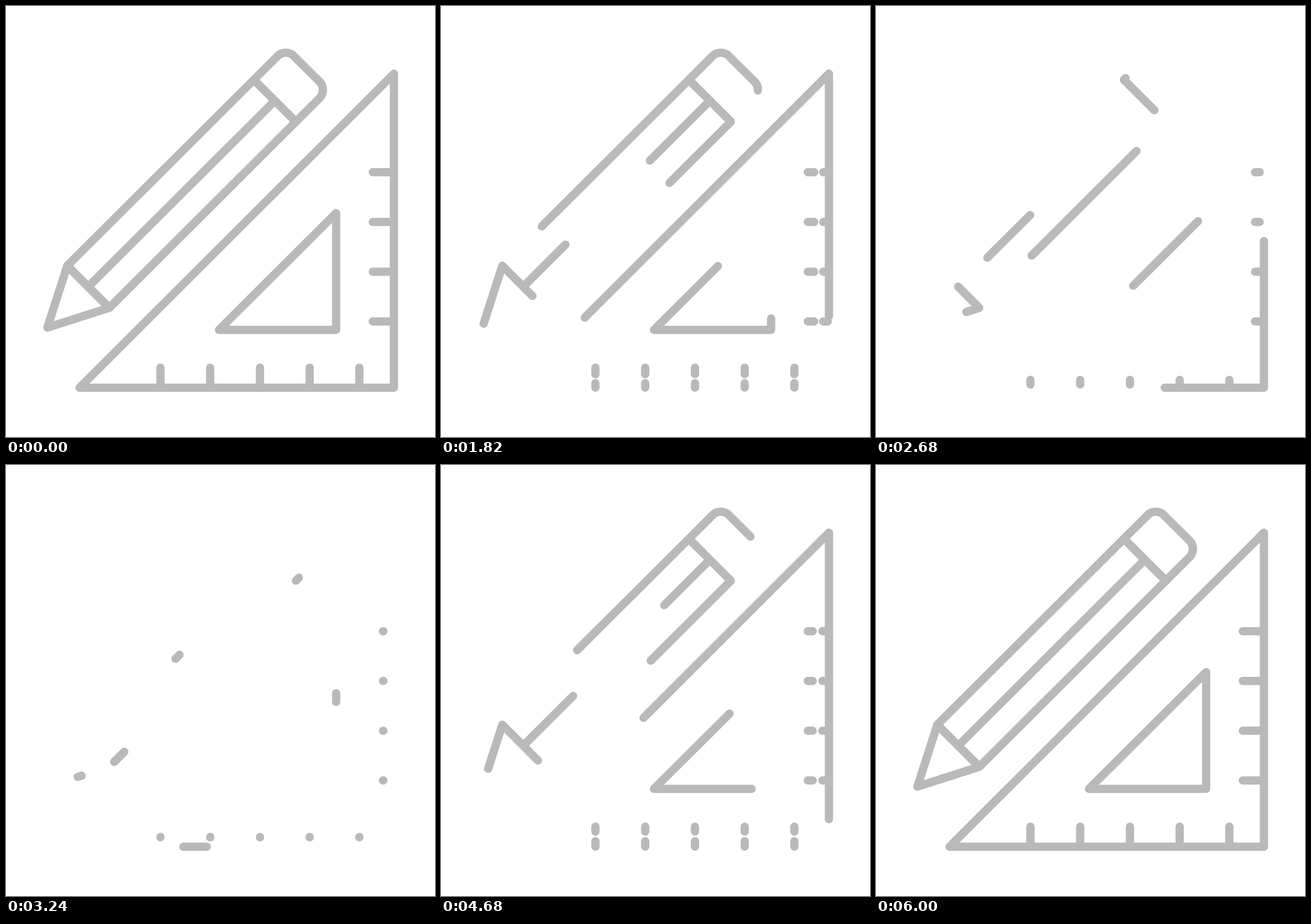
Write an HTML page that moves like this. It is 700 px wide and 704 px high and loops after 7.2 s.

```html
<!DOCTYPE html>
<html lang="en">
<head>
<meta charset="utf-8">
<title>Pencil and set square</title>
<style>
  html, body { margin: 0; width: 100%; height: 100%; overflow: hidden; background: #fff; }
  svg { display: block; width: 100%; height: 100%; }
  path {
    fill: none;
    stroke: #b9b9b9;
    stroke-width: 13.5;
    stroke-linecap: round;
    stroke-linejoin: round;
    animation: trace 7200ms linear infinite;
  }
  /* Rest until 600 ms, erase until 3300 ms, redraw until 6000 ms, rest. */
  @keyframes trace {
    0%, 8.33333% { stroke-dasharray: 100 0; stroke-dashoffset: 0; }
    45.83333% { stroke-dasharray: 0 100; stroke-dashoffset: -150; }
    83.33333%, 100% { stroke-dasharray: 100 0; stroke-dashoffset: -200; }
  }
</style>
</head>
<body>
<svg viewBox="0 0 700 704">
  <!-- set square -->
  <path pathLength="100" d="M633 110.5V623.5H120Z"/>
  <path pathLength="100" d="M347.5 529L538.7 338.2V529Z"/>
  <path pathLength="100" d="M631 271.5h-32.5"/>
  <path pathLength="100" d="M631 352.8h-32.5"/>
  <path pathLength="100" d="M631 434h-32.5"/>
  <path pathLength="100" d="M631 515.3h-32.5"/>
  <path pathLength="100" d="M252 623.3v-32.5"/>
  <path pathLength="100" d="M333.2 623.3v-32.5"/>
  <path pathLength="100" d="M414.4 623.3v-32.5"/>
  <path pathLength="100" d="M495.5 623.3v-32.5"/>
  <path pathLength="100" d="M576.6 623.3v-32.5"/>
  <!-- pencil: eraser, body, centre line, tip -->
  <path pathLength="100" d="M443.1 81.9L404.5 120.5L473 189L511.6 150.4A19 19 0 0 0 511.6 123.6L469.9 81.9A19 19 0 0 0 443.1 81.9Z"/>
  <path pathLength="100" d="M404.5 120.5L473 189L168.5 493L100 424.3Z"/>
  <path pathLength="100" d="M134.2 458.5L438.7 154.8"/>
  <path pathLength="100" d="M100 424.3L168.5 493L67.6 525.2Z"/>
</svg>
</body>
</html>
```
